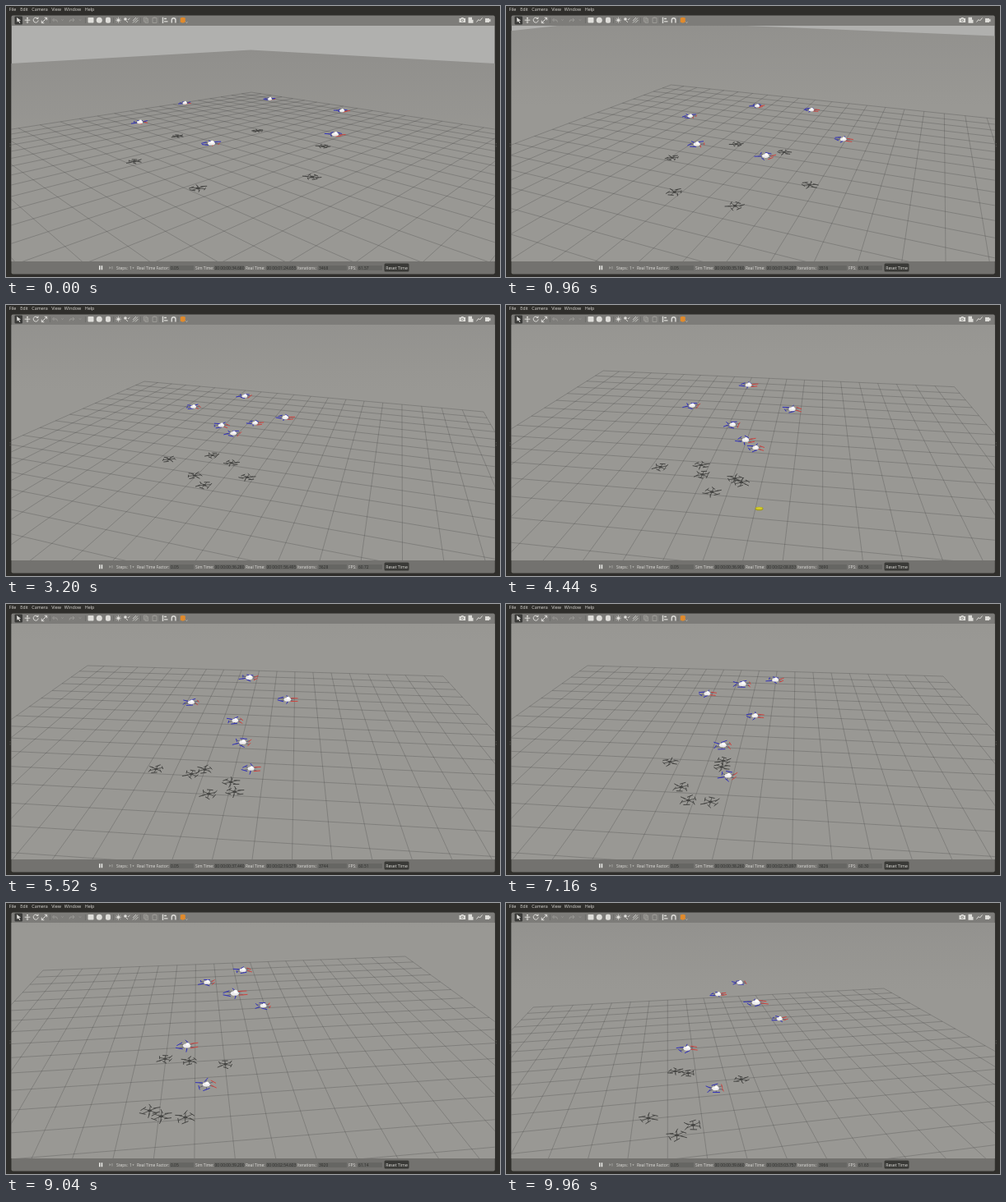
These frames come from a looping animation (600x330 px, 10000 ms). An HTML page with a canvas:

```html
<!DOCTYPE html>
<html lang="en">
<head>
<meta charset="utf-8">
<title>Drone swarm simulation</title>
<style>
  html, body { margin: 0; width: 600px; height: 330px; overflow: hidden; background: #2f2e2b; }
  canvas, svg { position: absolute; left: 0; top: 0; display: block; }
  text { font: 4.9px "Open Sans", "Noto Sans", sans-serif; fill: #e2e1dd; white-space: pre; }
  .menu text { fill: #dcdad5; font-size: 5.4px; text-anchor: middle; }
  .icons { fill: none; stroke: #deddd9; stroke-width: 1; }
  .icons .solid { fill: #deddd9; stroke: none; }
  .icons .dim { stroke: #9a9995; }
  .fields rect { fill: #666663; }
  .fields .value { fill: #2b2b29; }
</style>
</head>
<body>
<canvas id="view" width="600" height="330"></canvas>
<svg width="600" height="330" viewBox="0 0 600 330">
  <g class="menu">
    <text x="8" y="6">File</text><text x="22" y="6">Edit</text><text x="41" y="6">Camera</text>
    <text x="61" y="6">View</text><text x="81" y="6">Window</text><text x="101.500" y="6">Help</text>
  </g>
  <path d="M6.500 24V13.500q0-2 2-2H591.800q2 0 2 2V24Z" fill="#7d7c79"/>
  <path d="M6.500 311H593.800V324.600q0 2-2 2H8.500q-2 0-2-2Z" fill="#73726f"/>
  <path d="M4.500 167h1v1.500h-1zM4.500 170h1v1.500h-1zM594.800 167h1v1.500h-1zM594.800 170h1v1.500h-1z" fill="#55544f"/>
  <g class="icons">
    <rect x="10.500" y="12.500" width="9.500" height="10" rx="1" fill="#3b3b39" stroke="none"/>
    <path class="solid" d="M13 14l5 3.500-2 .4 1.300 2.500-1 .5-1.300-2.500-1.600 1.300z"/>
    <path d="M26 14v6.500M22.700 17.200h6.600M25 15l1-1 1 1M25 19.600l1 1 1-1"/>
    <path d="M38.500 15.200a3 3 0 1 0 .7 2.200M39 13.500v2h-2"/>
    <path d="M43.500 20.500l6-6M46.800 14.300h2.900v2.900M43.300 17.700v3h3"/>
    <path class="dim" d="M57 17h4.500l1 2.500M58.500 15l-2 2 2 2M67.500 16.500l1 1 1-1M82.500 17h-4.500l-1 2.500M81 15l2 2-2 2M89 16.500l1 1 1-1"/>
    <rect class="solid" x="99.500" y="14" width="7" height="6.500" rx=".8"/>
    <circle class="solid" cx="113.300" cy="17.200" r="3.500"/>
    <rect class="solid" x="121" y="13.700" width="6" height="7" rx="2"/>
    <circle class="solid" cx="136.500" cy="17.200" r="1.700"/>
    <path d="M136.500 13.500v7.400M132.900 17.200h7.300M134 14.700l5 5M139 14.700l-5 5" stroke-width=".6"/>
    <circle class="solid" cx="145" cy="16" r="1.800"/>
    <path d="M146 18l2 2M148 17l2.500-2" stroke-width=".9"/>
    <path d="M154 18l4-4M154 20.500l6-6M157 20.500l3.500-3.500" stroke-width=".8"/>
    <path class="dim" d="M167.500 14h3.500v5h-3.500zM169 15.500h3.500v5h-3.500zM178 14.500h5v6h-5zM179.500 14h2"/>
    <path d="M190.500 13.700v7.200M192 15.500h3M192 18.800h4.500" stroke-width="1.300"/>
    <path d="M201.300 20.600v-3.500a2.300 2.300 0 0 1 4.600 0v3.500" stroke-width="1.400"/>
    <path d="M53.500 14v7M96.500 14v7M130.500 14v7M163.500 14v7M187 14v7M209 14v7" stroke="#646360" stroke-width=".6"/>
    <path d="M211.800 14.500l3-.8 3 .8v5l-3 1.300-3-1z" fill="#e08a2c" stroke="none"/>
    <path d="M218.500 19.500l1 1 1-1" stroke-width=".6"/>
    <path class="solid" d="M550.500 15h2l.8-1h2l.8 1h2v5h-7.600z"/>
    <circle cx="554.300" cy="17.400" r="1.300" stroke="#676764" stroke-width=".7"/>
    <path class="solid" d="M561.500 13.800h4.500v3h1.500v4h-6z"/>
    <path d="M571.500 19.500l2.500-3 1.500 1.500 3-3.500"/>
    <path class="solid" d="M582 15h5v1.500l1.500-1v4l-1.500-1v1.500h-5z"/>
  </g>
  <path d="M113 316.300h1.500v5h-1.500zM115.700 316.300h1.500v5h-1.500z" fill="#efefec"/>
  <path d="M125.500 317l2 1.800-2 1.800zM128.500 317h.9v3.600h-.9z" fill="#a5a5a1"/>
  <g class="fields">
    <rect x="199" y="316" width="29" height="6"/><rect x="253" y="316" width="36" height="6"/>
    <rect x="316" y="316" width="36" height="6"/><rect x="379" y="316" width="35" height="6"/>
    <rect x="427" y="316" width="30" height="6"/>
    <text x="134" y="320.700">Steps:</text><text x="150" y="320.700">1</text>
    <path d="M153.500 318.500h2l-1 1.200z" fill="#e2e1dd"/>
    <text x="159" y="320.700">Real Time Factor:</text><text class="value" x="200" y="320.700">0.05</text>
    <text x="230" y="320.700">Sim Time:</text><text class="value" x="253.500" y="320.700" id="sim"></text>
    <text x="291" y="320.700">Real Time:</text><text class="value" x="316.500" y="320.700" id="real"></text>
    <text x="354" y="320.700">Iterations:</text><text class="value" x="380" y="320.700" id="iter"></text>
    <text x="416" y="320.700">FPS:</text><text class="value" x="428" y="320.700" id="fps"></text>
  </g>
  <rect x="459.500" y="313.500" width="30" height="10" rx="1.500" fill="#3a3a37"/>
  <text x="474.500" y="320.500" text-anchor="middle" style="font-size:5.2px">Reset Time</text>
</svg>
<script>
const LOOP = 10000, STEP = 40;
const F = 507.5, CX = 300, CY = 167.5, SIDE = 20, NEAR = 0.3;
const VIEW = [6.5, 24, 587.3, 287];
const LIGHT = [-0.556, -0.11];   // shadow shift on the ground per metre of height
const ctx = document.getElementById('view').getContext('2d');
const byId = id => document.getElementById(id);
const mix = (a, b, k) => a.map((v, i) => v + (b[i] - v) * k);
const clamp = k => Math.max(0, Math.min(1, k));
const easeOut = k => 1 - (1 - k) ** 2;

// Camera poses: far left grid corner, far right grid corner, horizon
const START = [298, 105, 705, 167, 24];
const DRAGS = [
  { from: 0, to: 1920, pose: [168, 93, 580, 130, -46] },
  { from: 4180, to: 4730, pose: [99, 75, 531, 88, -105], pivot: [307.5, 248] },
  { from: 7360, to: 8160, pose: [45, 82, 485, 65, -120], pivot: [357.5, 245.5] },
  { from: 9420, to: 9960, pose: [33, 127, 459, 104, -45] }
];

// The swarm starts on a ring, squeezes together, then each drone
// wanders at its own altitude. Ground points are metres from the grid centre.
const TIMES = [0, 1960, 5520, 7160, 8120, 9960];
const DRONES = [
  { turn: 180, alt: 2.65, path: [[-1.2, 1], [-0.8, 0.5], [-1.6, 0.6], [-1.1, -0.7]] },
  { turn: 240, alt: 3.6, path: [[0.6, 1.3], [0.5, 2.1], [-0.8, 2.9], [-0.6, 3.4]] },
  { turn: 0, alt: 3.1, path: [[1.7, 1.6], [1.3, 0.3], [-0.1, 0.8], [-0.4, -0.4]] },
  { turn: 120, alt: 2, path: [[0.1, 0.8], [0.7, 0.6], [-0.1, 0.7], [0.8, 0.3]] },
  { turn: 60, alt: 2, path: [[0.5, 2.2], [0, 2.6], [-1.6, 3.1], [-2.3, 2.2]] },
  { turn: 300, alt: 0.95, path: [[0.7, 1.9], [0.1, 2.5], [-1.4, 3.2], [-1.6, 2.7]] }
];

function waypoints({ turn, alt, path }) {
  const a = turn * Math.PI / 180, c = Math.cos(a), s = Math.sin(a);
  return [
    [1.4 + 3.75 * c, 1.65 + 3.75 * s, 1.65],
    [0.62 + 2.06 * c * Math.abs(c), 0.55 + 1.85 * s + 0.17 * c, 2.15],
    ...path.map((p, i) => [...p, alt + (TIMES[i + 2] - TIMES[2]) * 6e-5])
  ].map(([u, v, z]) => [u + SIDE / 2, v + SIDE / 2, z]);
}
const TRACKS = DRONES.map(waypoints);

// Smooth curve through the waypoints of one drone
function along(track, t) {
  const last = TIMES.length - 1;
  let i = 0;
  while (i < last - 1 && t >= TIMES[i + 1]) i++;
  const span = TIMES[i + 1] - TIMES[i], k = clamp((t - TIMES[i]) / span);
  const slope = (n, j) => {
    const a = Math.max(0, n - 1), b = Math.min(last, n + 1);
    return (track[b][j] - track[a][j]) / (TIMES[b] - TIMES[a]) * span;
  };
  const k2 = k * k, k3 = k2 * k;
  return track[i].map((p, j) =>
    (2 * k3 - 3 * k2 + 1) * p + (k3 - 2 * k2 + k) * slope(i, j) +
    (3 * k2 - 2 * k3) * track[i + 1][j] + (k3 - k2) * slope(i + 1, j));
}

function cameraAt(t) {
  const [x1, y1, x2, y2, horizon] = DRAGS.reduce((pose, d) =>
    mix(pose, d.pose, easeOut(clamp((t - d.from) / (d.to - d.from)))), START);
  const tan = (CY - horizon) / F, cos = 1 / Math.hypot(1, tan);
  const ground = (x, y) => [(x - CX) / (cos * (y - horizon)), F / (cos ** 2 * (y - horizon)) - tan];
  // The grid side has a known length, which sets the camera height
  const p = ground(x1, y1), q = ground(x2, y2);
  const dx = q[0] - p[0], dz = q[1] - p[1], len = Math.hypot(dx, dz), h = SIDE / len;
  return { horizon, cos, sin: tan * cos, h, corner: [p[0] * h, p[1] * h], e: [dx / len, dz / len] };
}

function toCamera({ corner, e, h, cos, sin }, [u, v, z = 0]) {
  const fwd = corner[1] + u * e[1] - v * e[0], down = h - z;
  return [corner[0] + u * e[0] + v * e[1], down * cos - fwd * sin, fwd * cos + down * sin];
}

const toScreen = ([x, y, d]) => [CX + F * x / d, CY + F * y / d];
const project = (cam, p) => toScreen(toCamera(cam, p));

// World shape to a path, cut at the near plane
function trace(cam, points) {
  const pts = points.map(p => toCamera(cam, p)), out = [];
  pts.forEach((a, i) => {
    const b = pts[(i + 1) % pts.length];
    if (a[2] >= NEAR) out.push(a);
    if ((a[2] >= NEAR) !== (b[2] >= NEAR)) out.push(mix(a, b, (NEAR - a[2]) / (b[2] - a[2])));
  });
  out.forEach((p, i) => ctx[i ? 'lineTo' : 'moveTo'](...toScreen(p)));
}

function drawGround(cam) {
  ctx.fillStyle = '#b0b0ae';
  ctx.fillRect(...VIEW);
  const shade = ctx.createLinearGradient(0, cam.horizon + 28, 0, cam.horizon + 150);
  shade.addColorStop(0, '#908f8c');
  shade.addColorStop(1, '#999894');
  ctx.fillStyle = shade;
  ctx.beginPath();
  trace(cam, [[-40, -40], [60, -40], [60, 60], [-40, 60]]);
  ctx.fill();

  ctx.strokeStyle = 'rgba(55,55,53,.36)';
  ctx.lineWidth = 0.7;
  ctx.beginPath();
  for (let i = 0; i <= SIDE; i++) {
    trace(cam, [[i, 0], [i, SIDE]]);
    trace(cam, [[0, i], [SIDE, i]]);
  }
  ctx.stroke();
}

function line(cam, a, b, color, width) {
  ctx.strokeStyle = color;
  ctx.lineWidth = width;
  ctx.beginPath();
  ctx.moveTo(...project(cam, a));
  ctx.lineTo(...project(cam, b));
  ctx.stroke();
}

function blob(x, y, rx, ry, color) {
  ctx.fillStyle = color;
  ctx.beginPath();
  ctx.ellipse(x, y, rx, ry, 0, 0, 7);
  ctx.fill();
}

// Six arms with a two-blade propeller on each
function drawCopter(cam, hub, spin, shadow) {
  const at = ([u, v, z], a, r) => [u + r * Math.cos(a), v + r * Math.sin(a), z];
  const dark = '#444442';
  for (let i = 0; i < 6; i++) {
    const angle = (i + 0.5) * Math.PI / 3, blade = spin + i * 1.9;
    const tip = at(hub, angle, 0.22), front = i === 0 || i === 5;
    line(cam, hub, tip, shadow ? dark : '#55556a', 0.8);
    line(cam, at(tip, blade, 0.1), at(tip, blade, -0.1),
      shadow ? dark : front ? '#d0443e' : '#3030bc', 1);
  }
  const [x, y] = project(cam, hub), m = F / toCamera(cam, hub)[2];
  if (shadow) return blob(x, y, 0.06 * m, 0.035 * m, dark);
  blob(x, y, 0.1 * m, 0.055 * m, '#eeecec');
  blob(x + 0.02 * m, y - 0.04 * m, 0.045 * m, 0.04 * m, '#ffffff');
}

// Marker at the point the view is being turned around
function drawPivot(t) {
  const drag = DRAGS.find(d => d.pivot && t > d.from && t <= d.to);
  if (!drag) return;
  const [x, y] = drag.pivot;
  blob(x, y, 5, 2.3, '#a09a1c');
  blob(x, y - 0.4, 4, 1.5, '#d2cb2a');
}

function clock(s) {
  const pad = (n, len) => String(Math.floor(n)).padStart(len, '0');
  return `00 00:${pad(s / 60, 2)}:${pad(s % 60, 2)}.${pad(s * 1000 % 1000, 3)}`;
}

function drawCounters(t) {
  const iterations = 3468 + Math.floor(t / 20);
  byId('sim').textContent = clock(iterations / 100 + 1e-6);
  byId('real').textContent = clock(84.655 + t * 0.00995);
  byId('iter').textContent = iterations;
  byId('fps').textContent = (61.2 + 1.1 * Math.sin(Math.floor(t / 120) * 2.3 + 0.34)).toFixed(2);
}

function frame() {
  const t = Math.floor(performance.now() % LOOP / STEP) * STEP;
  const cam = cameraAt(t), drones = TRACKS.map(track => along(track, t));
  const spin = i => t * 0.011 + i;
  ctx.clearRect(0, 0, 600, 330);
  ctx.save();
  ctx.beginPath();
  ctx.rect(...VIEW);
  ctx.clip();
  drawGround(cam);
  drones.forEach(([u, v, z], i) =>
    drawCopter(cam, [u + z * LIGHT[0], v + z * LIGHT[1], 0], spin(i), true));
  drawPivot(t);
  drones.forEach((hub, i) => drawCopter(cam, hub, spin(i), false));
  ctx.restore();
  drawCounters(t);
  requestAnimationFrame(frame);
}
frame();
</script>
</body>
</html>
```
